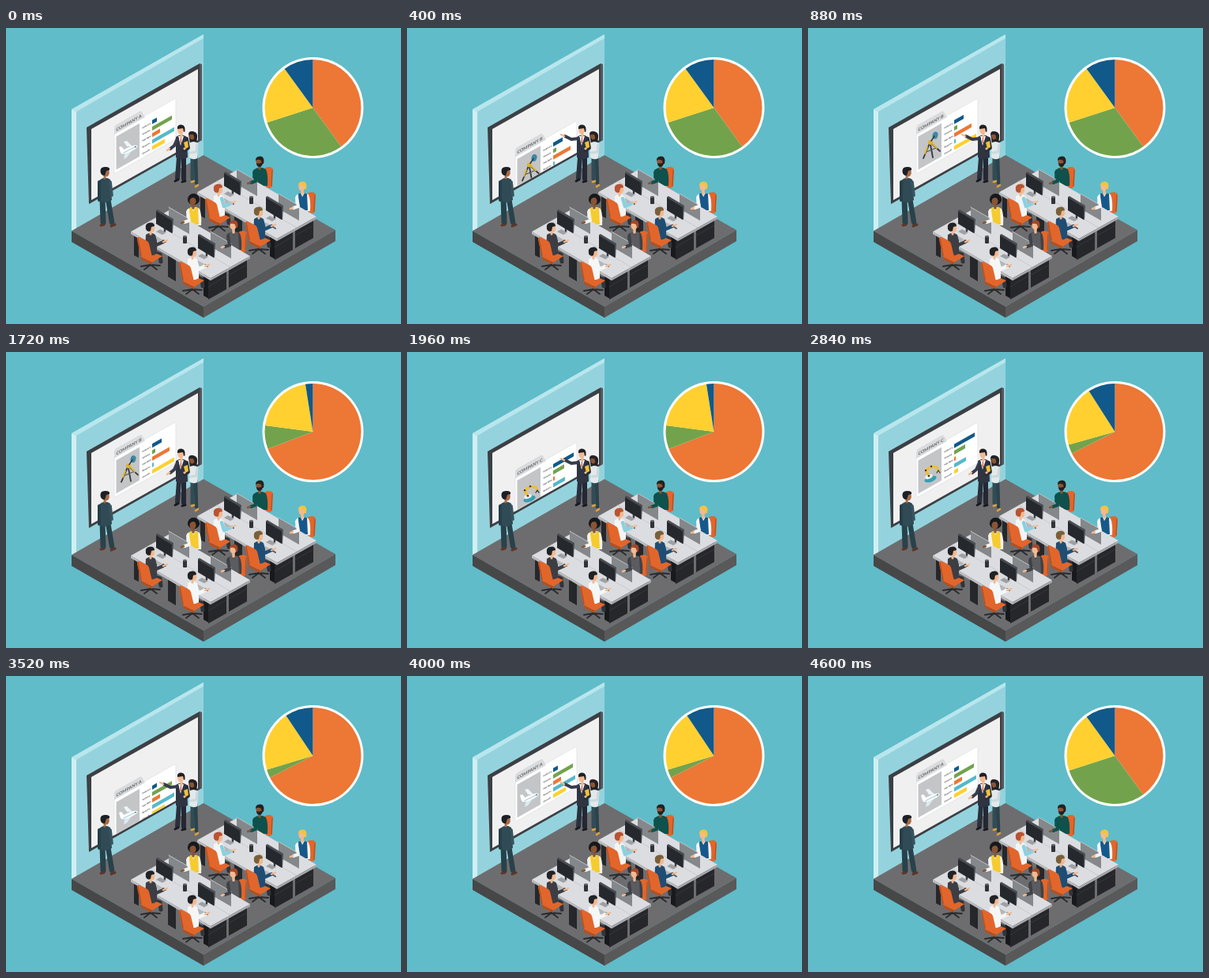
An HTML page that plays this animation: 500 by 375 pixels, repeating every 4.64 s.

```html
<!DOCTYPE html>
<html lang="en">
<head>
<meta charset="utf-8">
<title>Team briefing</title>
<style>
html, body { margin: 0; width: 100%; height: 100%; overflow: hidden; background: #60bcc9; }
svg { display: block; width: 500px; height: 375px; }
text { font-family: Lato, "Open Sans", sans-serif; }
</style>
</head>
<body>
<svg id="stage" viewBox="0 0 500 375" xmlns="http://www.w3.org/2000/svg"></svg>
<script>
const LOOP = 4640, STEP = LOOP / 3;
const C = {
  orange: '#ed7735', green: '#72a34c', yellow: '#ffd030', blue: '#11598a', teal: '#55b9cb',
  chair: '#e2662b', skin: '#f3b98f', brown: '#8a5534'
};
const COLORS = [C.blue, C.green, C.orange, C.teal, C.yellow];
const companies = [
  { name: 'A', bars: [6, 25, 10, 28, 16], pie: [.4, .7, .9] },
  { name: 'B', bars: [12, 4, 22, 2, 28], pie: [.692, .771, .975] },
  { name: 'C', bars: [26, 14, 2, 15, 5], pie: [.675, .703, .906] }
];

const poly = (pts, fill, more = '') => `<polygon points="${pts}" fill="${fill}" ${more}/>`;
const path = (d, fill, more = '') => `<path d="${d}" fill="${fill}" ${more}/>`;
const line = (d, color, w) => path(d, 'none', `stroke="${color}" stroke-width="${w}" stroke-linecap="round" stroke-linejoin="round"`);
const oval = (x, y, rx, ry, fill, turn = 0) =>
  `<ellipse cx="${x}" cy="${y}" rx="${rx}" ry="${ry}" fill="${fill}" transform="rotate(${turn} ${x} ${y})"/>`;
const rect = (x, y, w, h, fill, r = 0) => `<rect x="${x}" y="${y}" width="${w}" height="${h}" rx="${r}" fill="${fill}"/>`;
const at = (x, y, body) => `<g transform="translate(${x} ${y})">${body}</g>`;

function room() {
  return poly('83,103 250,8 250,162 83,258', '#94d3dd') +
    poly('83,103 89,106 89,255 83,258', '#d0eff3') +
    poly('83,103 250,8 250,13 89,106', '#b9e6ed') +
    poly('83,257 250,161 417,256 250,353', '#6d6d6f') +
    poly('83,257 250,353 250,367 83,271', '#474748') +
    poly('417,256 250,353 250,367 417,270', '#59595a') +
    poly('102,126 245,45 248,46 248,142 105,223', '#3c3f44') +
    poly('245,46 248,46 248,142 245,143', '#55585d') +
    poly('108,128 243,52 243,142 108,218', '#f0f0f1');
}

const pictures = [
  () => poly('153,150 149,144 153,143 160,150', '#eef5f8') +
    poly('151,155 149,166 153,164 161,153', '#dcebf1') +
    oval(156, 154, 11.5, 3, '#fff', -24) +
    poly('145,158 143,151 146,150 151,156', '#fff') +
    line('M149 158L163 151', '#79b9cf', .8) + oval(164, 150.5, 1.3, .8, '#4b8297', -24),
  () => line('M154 146L146 165M155 148L158 164M156 146L167 156', '#34373c', 1.8) +
    line('M150 157L162 152', '#55585c', 1.2) +
    line('M151 151L148 159M157 146L163 152', '#e2b62f', 2) +
    oval(161, 136, 3.4, 4.6, '#3a87a5', 15) + oval(155, 145, 3, 3, '#dfb12c') +
    line('M156 143L160 137', '#34373c', 1.5),
  () => oval(155, 161, 8, 3.6, '#3a9fb4', -20) + oval(153, 158, 5, 2.6, '#eef0f1', -20) +
    line('M153 157L149 150L156 145L163 146L165 150', '#f2bd2c', 3) +
    line('M165 150L163 153M165 150L167 153', '#34373c', 1.2) +
    [[149, 150], [156, 145], [153, 157]].map(([x, y]) => oval(x, y, 1.2, 1.2, '#34373c')).join('')
];

function card({ name, bars }, i) {
  const words = ['Industry', 'Volume', 'Net Rate', 'Returns', 'Growth'];
  const rows = bars.map((w, n) => {
    const y = 11 + n * 8.2;
    return `<text x="35.5" y="${y + 3.8}" font-size="2.9" font-weight="700" fill="#444">${words[n]}</text>` +
      rect(48, y, w, 5, COLORS[n]);
  }).join('');
  return `<g class="card"><g transform="matrix(1 -.567 0 1 137 133)">` +
    `<rect width="78" height="52" rx="3" fill="#fff" stroke="#dfe2e3" stroke-width=".7"/>` +
    path('M0 2V-6Q0-9 3-9H32Q34-9 35-7L39 2Z', '#d9dbdc') +
    `<text x="2.5" y="-.5" font-size="5.4" font-weight="700" fill="#5f6266">COMPANY ${name}</text>` +
    rect(2.5, 6, 29.5, 42, '#c3c5c7') + rows + `</g>${pictures[i]()}</g>`;
}

function chairBase(x, y) {
  return at(x, y, line('M0-9V1', '#33353a', 2) +
    line('M0 0L-12 2M0 0L12 1M0 0L-8 6M0 0L8 6M0 0L0-3', '#292b2f', 1.8));
}

// Seen from behind, on the left side of a desk; origin is the head.
function backSeat(x, y, hair, top, arm = top) {
  return chairBase(x + 1, y + 47) + at(x, y,
    line('M2 31L13 34L14 43', '#30343b', 5) +
    poly('-11,37 2,30 16,36 3,44', C.chair) + poly('-11,37 3,44 3,47 -11,40', '#b64f1d') +
    path('M-5 9Q1 4 7 9L9 17L9 33Q0 38-6 32Z', top) +
    line('M5 12L8 22L17 18', arm, 4.4) + line('M17 18L22 16', C.skin, 2.4) +
    path('M-13 12Q-16 11-16 15L-12 34Q-11 37-8 38L1 41Q4 41 3 37L-1 20Q-2 17-5 16Z', C.chair) +
    line('M-15 14L-11 35', '#b64f1d', 1.4) +
    oval(2.5, 1, 3.8, 5, C.skin) + line('M1 4V8', C.skin, 3) +
    path('M-5 2Q-7-6 1-6.5Q6-6.5 6-2L2-1L1 4Q-3 6-5 2Z', hair));
}

// Facing the viewer, on the far side of a desk; origin is the head.
function frontSeat(x, y, { hair, skin, top, vest, chair, afro, beard }) {
  return at(x, y,
    (chair ? path('M7 8Q15 5 17 10L16 31Q15 35 9 33L4 28Z', C.chair) + line('M16 11L15 31', '#b64f1d', 1.2) : '') +
    path('M-8 11Q0 5 8 10Q11 17 10 31L-4 31L-9 22Z', top) +
    (vest ? path('M-5 9L-2 8L0 13L3 8L6 9L7 30L-4 30Z', vest) : '') +
    line('M0 4V9', skin, 3.4) + (afro ? oval(.5, -2, 7.6, 7.2, hair) : '') +
    oval(-.5, .5, 4, 5, skin) +
    (afro ? path('M-5-1Q-3-5 4-4L4-6L-4-7Z', hair)
      : path('M-5 0Q-6-6.5 1-6.5Q7-6 5 3L3 3L2-1Q-1-3-4-2Z', hair)) +
    (beard ? path('M-4 2Q-1 4 4 1Q4 7-1 7Q-4 6-4 2Z', hair) : ''));
}

const forearm = (x, y, { skin, top }) =>
  at(x, y, line('M-7 14L-5 25L-11 27', top, 4) + line('M-12 27L-15 28', skin, 2.4));

function station(x, y) {
  return at(x, y,
    poly('206,227 232,242 232,261 206,246', '#85888b') + line('M206 227L232 242', '#bfc2c4', 1) +
    poly('195,255 203,259 198,262 190,258', '#9da0a4') + line('M201 250V257', '#393c41', 2.5) +
    poly('190,231 192,230 212,242 211,260 190,247', '#4a4d53') +
    poly('190,232 210,244 210,260 190,248', '#25282d') +
    poly('189,263 198,268 193,271 184,266', '#b4b7ba') +
    line('M199 269L202 271', '#55585c', 2));
}

function desk(x, y) {
  return at(x, y,
    poly('162,261 168,264 168,291 162,288', '#25272b') +
    poly('205,286 215,292 215,321 205,315', '#25272b') +
    poly('250,311 257,316 257,343 250,339', '#17191c') +
    poly('256,318 279,305 279,331 256,344', '#26272a') +
    poly('282,303 305,290 305,316 282,329', '#26272a') +
    line('M256 328L279 314M282 313L305 300', '#3e4044', .7) +
    poly('158,258 208,230 309,289 259,317', '#dcdde0') +
    poly('158,258 259,317 259,320 158,261', '#babdc1') +
    poly('309,289 259,317 259,320 309,292', '#a5a8ac') +
    line('M183 244L284 303', '#c3c6ca', .8) +
    rect(224, 264, 5, 9, '#303338', 1) + oval(226.5, 264, 2.5, 1.2, '#62666c'));
}

const workplace = (x, y) => desk(x * 84, y * 50) + station(x * 86, y * 48) + station(x * 86 + 53, y * 48 + 31);

const afroWoman = { hair: '#18191c', skin: C.brown, top: '#f4f3ee', vest: '#f6cb2f', afro: true };
const redMan = { hair: '#a2482a', skin: C.skin, top: '#3f4247', vest: '#5a5c60', chair: true };
const beardMan = { hair: '#24211f', skin: C.brown, top: '#0f514c', chair: true, beard: true };
const blondMan = { hair: '#f5c33c', skin: C.skin, top: '#f2f4f4', vest: '#17588a', chair: true };

function seating() {
  return frontSeat(321, 169, beardMan) + frontSeat(375, 201, blondMan) +
    workplace(1, -1) +
    forearm(321, 169, beardMan) + forearm(375, 201, blondMan) +
    backSeat(268, 204, '#b95332', '#f1f5f6', '#8bd0df') + backSeat(319, 233, '#79603a', '#1f4d74') +
    frontSeat(237, 219, afroWoman) + frontSeat(288, 250, redMan) +
    workplace(0, 0) +
    forearm(237, 219, afroWoman) + forearm(288, 250, redMan) +
    backSeat(182, 253, '#202226', '#3c3e44') + backSeat(235, 284, '#202226', '#f5f6f6');
}

function standing() {
  const listener = at(0, -1,
    line('M122 217L123 247', '#28424b', 7) + line('M129 217L134 247', '#28424b', 6.5) +
    line('M120 251L124 250M133 252L138 250', '#5d3528', 3) +
    path('M118 194Q125 188 132 193L134 219Q125 225 117 219Z', '#304b55') +
    line('M118 196L118 219', '#263f49', 4) + line('M132 196L134 213', '#38545e', 3.6) +
    oval(127, 184, 3.8, 5.3, '#a86c48') + line('M125 187V191', '#a86c48', 3) +
    path('M119.5 183Q119 176.5 126 177Q132 177 131 181L127 182L125 188Q120 188 119.5 183Z', '#1d2024'));
  const woman =
    line('M236 163L236 191', '#324c55', 5) + line('M240 163L241 196', '#2a434c', 4.6) +
    line('M235 195L238 194M240 201L243 199', '#e0a337', 2.6) +
    path('M231 134Q232 130 237 131Q243 132 242 139L241 147L233 147Z', '#222125') +
    path('M232 146Q237 142 243 146L242 165Q237 168 232 164Z', '#e3e9ea') +
    line('M242 148L241 157L234 158', '#cdd8da', 3.2) +
    oval(235.5, 137, 3.2, 4.4, C.brown) + path('M232 135Q233 131 239 133L239 140L237 135Z', '#222125');
  const speaker =
    line('M219 164L217 190', '#2a2f3c', 6) + line('M225 164L225 191', '#242834', 6) +
    line('M214 194L218 192M223 195L227 194', '#16191f', 2.8) +
    path('M215 138Q222 133 229 138L230 164Q222 168 215 164Z', '#2e3442') +
    poly('218,137 225,137 221,149', '#f5f6f6') + poly('221,138 222,138 222,147 220.5,145', '#d6593a') +
    line('M229 140L231 152L226 155', '#262b37', 3.8) +
    poly('225,145 230,143 231,151 227,153', '#f3c234') + oval(226, 153, 1.6, 1.4, C.skin) +
    oval(221, 129.5, 3.6, 5, C.skin) + line('M222 133V137', C.skin, 3.2) +
    path('M217 128Q216 122.5 222 122.5Q227.5 123 226.5 131L225 132L224 127Z', '#1f2125');
  return listener + woman + speaker +
    `<path id="sleeve" fill="none" stroke="#363c4b" stroke-width="4" stroke-linecap="round" stroke-linejoin="round"/>` +
    `<path id="hand" fill="none" stroke="${C.skin}" stroke-width="2.4" stroke-linecap="round"/>`;
}

const stage = document.getElementById('stage');
stage.innerHTML = `<defs><clipPath id="screen"><polygon points="108,128 243,52 243,142 108,218"/></clipPath></defs>` +
  rect(0, 0, 500, 375, '#60bcc9') + room() +
  `<g clip-path="url(#screen)">${companies.map(card).join('')}</g>` +
  seating() + standing() + oval(388.5, 101, 64, 64, '#fff') +
  [C.orange, C.green, C.yellow, C.blue].map(c => path('', c, 'class="slice"')).join('');

const cards = [...stage.querySelectorAll('.card')];
const slices = [...stage.querySelectorAll('.slice')];
const sleeve = document.getElementById('sleeve'), hand = document.getElementById('hand');

const span = (t, start, length) => Math.min(1, Math.max(0, (t - start) / length));
const easeIn = t => t ** 3;
const easeOut = t => 1 - (1 - t) ** 3;
const easeBoth = t => t < .5 ? 4 * t ** 3 : 1 - 4 * (1 - t) ** 3;
const mix = (a, b, t) => a + (b - a) * t;

function wedge(from, to) {
  const rim = f => {
    const a = f * Math.PI * 2;
    return `${(388.5 + 61 * Math.sin(a)).toFixed(2)} ${(101 - 61 * Math.cos(a)).toFixed(2)}`;
  };
  return `M388.5 101L${rim(from)}A61 61 0 ${to - from > .5 ? 1 : 0} 1 ${rim(to)}Z`;
}

function draw(time) {
  const k = Math.floor(time / STEP), p = time - k * STEP, next = (k + 1) % 3;

  const out = -100 * easeIn(span(p, 150, 150));
  const into = 100 * (1 - easeOut(span(p, 230, 500)));
  cards.forEach((el, i) => {
    const y = i === k ? out : i === next ? into : 200;
    el.setAttribute('transform', `translate(0 ${y.toFixed(2)})`);
  });

  const e = easeBoth(span(p, 910, 500));
  const cuts = [0, ...companies[k].pie.map((v, i) => mix(v, companies[next].pie[i], e)), 1];
  slices.forEach((el, i) => el.setAttribute('d', wedge(cuts[i], cuts[i + 1])));

  const lift = easeBoth(span(p, 220, 190)) - easeBoth(span(p, 950, 200));
  const ex = mix(213, 208, lift), ey = mix(149, 141, lift);
  const hx = mix(208, 200, lift), hy = mix(153, 137, lift);
  sleeve.setAttribute('d', `M217 140L${ex} ${ey}L${hx} ${hy}`);
  hand.setAttribute('d', `M${hx - 1} ${hy}L${mix(204, 195, lift)} ${mix(155, 135, lift)}`);
}

const begin = performance.now();
function tick() {
  draw((performance.now() - begin) % LOOP);
  requestAnimationFrame(tick);
}
tick();
</script>
</body>
</html>
```
